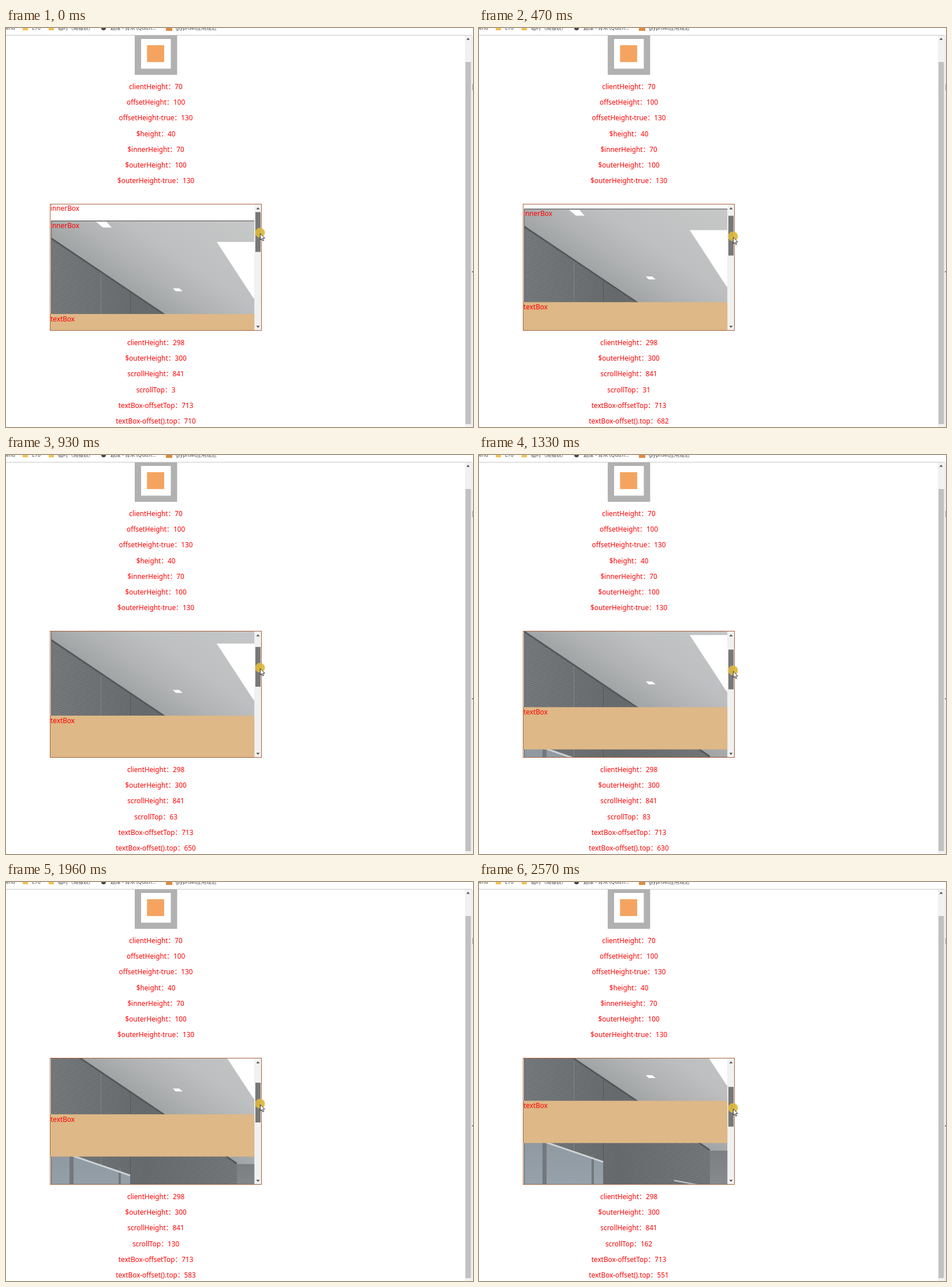
Write an HTML page that moves like this. It is 809 by 692 pixels and loops after 2650 ms.

```html
<!DOCTYPE html>
<html lang="zh-CN">
<head>
<meta charset="utf-8">
<title>Scroll metrics</title>
<style>
html, body { margin: 0; width: 100%; height: 100%; overflow: hidden; background: #fff; }
svg { display: block; }
text { font: 11.8px "Noto Sans", "Noto Sans CJK SC", "Noto Sans CJK", sans-serif; fill: #f00; }
#labels text { text-anchor: middle; }
#bar text { font-size: 8.8px; fill: #444; }
</style>
</head>
<body>
<svg width="809" height="692" viewBox="0 0 809 692">
  <defs>
    <clipPath id="view"><rect x="77" y="306" width="353.5" height="218.5"/></clipPath>
    <clipPath id="wallClip"><path d="M78 363L400 580V700H78Z"/></clipPath>
    <linearGradient id="ceiling" gradientUnits="userSpaceOnUse" x1="180" y1="432" x2="301" y2="253">
      <stop offset="0" stop-color="#a1a4a5"/>
      <stop offset=".2" stop-color="#b0b2b3"/>
      <stop offset=".45" stop-color="#bdbfc0"/>
      <stop offset="1" stop-color="#c6c8c8"/>
    </linearGradient>
    <linearGradient id="wall" x1="0" y1="0" x2="1" y2="0">
      <stop offset="0" stop-color="#797c7e"/>
      <stop offset=".5" stop-color="#696c6e"/>
      <stop offset="1" stop-color="#77797b"/>
    </linearGradient>
    <linearGradient id="pane" x1="0" y1="0" x2="0" y2="1">
      <stop offset="0" stop-color="#8f989f"/>
      <stop offset="1" stop-color="#9ba8b4"/>
    </linearGradient>
    <linearGradient id="back" x1="0" y1="0" x2="0" y2="1">
      <stop offset="0" stop-color="#7b7f82"/>
      <stop offset="1" stop-color="#94989a"/>
    </linearGradient>
  </defs>

  <g id="bar">
    <text x="0" y="3">enu</text>
    <path fill="#f2c14e" d="M29 0h9v4h-9zM74 0h9v4h-9z"/>
    <text x="45" y="3">E70</text>
    <text x="90" y="3">临时（周报表）</text>
    <circle cx="169" cy="0" r="4" fill="#4a4540"/>
    <text x="181" y="3">题库 - 青禾 (Quizn...</text>
    <rect x="277" y="-6" width="11" height="11" fill="#e08a3c"/>
    <text x="294" y="3">glyphset应用规范</text>
  </g>
  <path stroke="#c9c9c9" d="M0 12.5H807"/>

  <path fill="#b1b1b1" d="M223 13h73.5v68.3H223z"/>
  <path fill="#fff" d="M234 19h51.5v51.5H234z"/>
  <path fill="#f4a460" d="M244.300 29.800h29.700v29.300h-29.700z"/>

  <path fill="#f1f1f1" d="M795 13h11.5v679H795z"/>
  <path fill="#c1c1c1" d="M796 59h9.5v628H796z"/>
  <path fill="#505050" d="M797.5 20.5l3-3.5l3 3.5z"/>
  <path stroke="#dcdcdc" d="M807.5 13V692"/>
  <path fill="#aaa" d="M808 97h1v11h-1z"/>
  <path fill="#555" d="M807 422h2v1.5h-2z"/>

  <g id="labels"></g>

  <g clip-path="url(#view)">
    <g id="content">
      <text x="77" y="316.6">innerBox</text>
      <rect x="78" y="334" width="353" height="370" fill="url(#ceiling)"/>
      <path fill="#fff" d="M365 371H431V471L427 466Z"/>
      <path fill="#fff" d="M156 336h18l9 10h-15zM289 451.500h11l6 5h-12z"/>
      <path fill="url(#back)" d="M400 582.5H431V704H400Z"/>
      <g clip-path="url(#wallClip)">
        <path fill="url(#wall)" d="M78 363H400V704H78Z"/>
        <path id="slats" fill="none" stroke="#54575a" stroke-width="1.2" opacity=".4"/>
        <path stroke="#8f9294" stroke-width=".8" opacity=".8" d="M164.500 422V704"/>
        <path stroke="#55585a" d="M215.500 456V600"/>
        <path stroke="#55585a" stroke-width="4" d="M78 364L400 581"/>
        <path fill="url(#pane)" d="M78 555L215 602V704H78Z"/>
        <path fill="#72787d" d="M110 555h7v149h-7zM195 590h4v114h-4z"/>
        <path stroke="#d0d3d5" stroke-width="3" d="M78 555L215 602"/>
        <path stroke="#b9bdbf" stroke-width="2.500" d="M338 634L400 646"/>
      </g>
      <path fill="none" stroke="#4a4a4a" d="M78.500 704V334.500H431"/>
      <text x="77" y="346.6">innerBox</text>
      <rect x="77" y="496" width="354" height="73.300" fill="#deb887"/>
      <text x="77" y="508.8">textBox</text>
    </g>
  </g>

  <path fill="#f1f1f1" d="M430.500 306h12v218.500h-12z"/>
  <path fill="#505050" d="M433.500 314.500l3-3.500l3 3.500zM433.500 516.500l3 3.500l3-3.500z"/>
  <rect id="thumb" x="432" y="319.300" width="9" height="69" fill="#787878"/>
  <rect x="76.500" y="305.500" width="366" height="219" fill="none" stroke="#a8623c"/>
  <g id="pointer">
    <circle cx="440" cy="355" r="8.500" fill="#dcb93e" opacity=".92"/>
    <path fill="#fff" stroke="#222" stroke-width=".9" d="M440.500 356.500v11l2.500-2.300l1.800 4l1.800-.8l-1.800-3.900h3.500z"/>
  </g>
</svg>
<script>
const LOOP = 2650, SCALE = 0.7333, START = 3, OFFSET_TOP = 713;

// [time in ms, scrollTop]
const steps = [
  [0, 3], [80, 6], [230, 9], [310, 16], [390, 22], [470, 31], [540, 38],
  [620, 44], [700, 50], [790, 53], [860, 57], [930, 63], [1000, 66], [1090, 70],
  [1240, 76], [1330, 83], [1420, 92], [1490, 98], [1640, 105], [1720, 111],
  [1800, 117], [1880, 124], [1960, 130], [2190, 136], [2260, 143],
  [2490, 152], [2570, 162]
];

const $ = id => document.getElementById(id);

function addLabels(y, lines) {
  return lines.map((line, i) => {
    const el = document.createElementNS('http://www.w3.org/2000/svg', 'text');
    el.setAttribute('x', 259.6);
    el.setAttribute('y', y + i * 27.17);
    el.textContent = line;
    return $('labels').appendChild(el);
  });
}

addLabels(106, [
  'clientHeight：70', 'offsetHeight：100', 'offsetHeight-true：130', '$height：40',
  '$innerHeight：70', '$outerHeight：100', '$outerHeight-true：130'
]);
const stats = addLabels(550, [
  'clientHeight：298', '$outerHeight：300', 'scrollHeight：841', '',
  'textBox-offsetTop：713', ''
]);

let slats = '';
for (let y = 280; y < 710; y += 3.8) slats += `M78 ${y}l330 92`;
$('slats').setAttribute('d', slats);

const shift = (id, dy) => $(id).setAttribute('transform', `translate(0 ${dy.toFixed(2)})`);

function show(top) {
  const moved = top - START;
  shift('content', -moved * SCALE);
  shift('thumb', moved * 0.2264);
  shift('pointer', moved * 0.2327);
  stats[3].textContent = 'scrollTop：' + top;
  stats[5].textContent = 'textBox-offset().top：' + (OFFSET_TOP - top);
}

let shown;
function tick() {
  const t = performance.now() % LOOP;
  const top = steps.filter(s => s[0] <= t).pop()[1];
  if (top !== shown) show(shown = top);
  requestAnimationFrame(tick);
}
tick();
</script>
</body>
</html>
```
